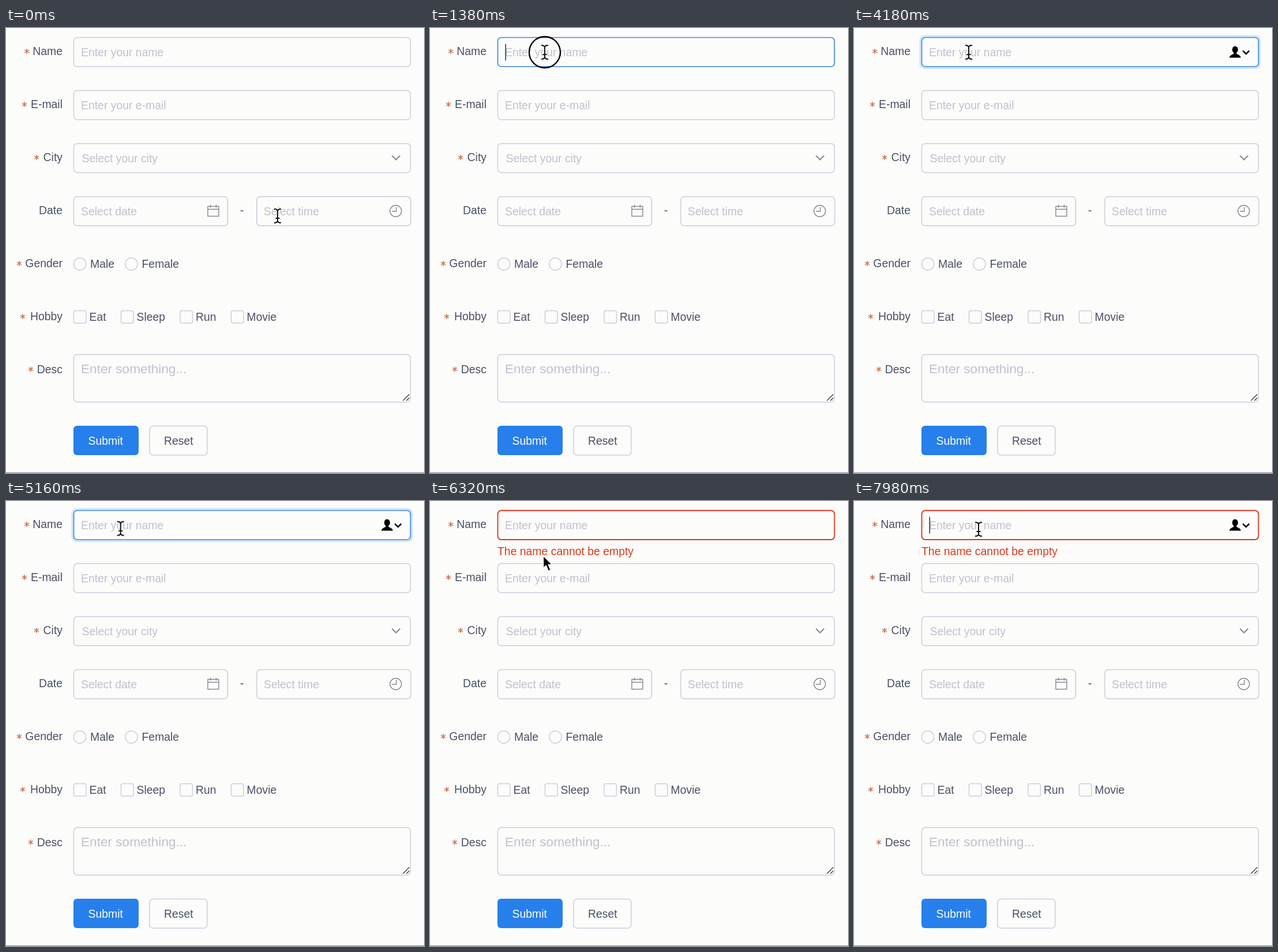
Recreate the animation shown at these times as an HTML page. Size 725x772 px, loop 8000 ms.

```html
<!DOCTYPE html>
<html lang="en">
<head>
<meta charset="utf-8">
<title>Form validation</title>
<style>
  html, body { margin: 0; width: 100%; height: 100%; overflow: hidden; background: #fcfcfb; }
  svg { display: block; width: 725px; height: 772px; font: 19.4px "Liberation Sans", Arial, sans-serif; }
  text { fill: #4a5062; }
  .hint { fill: #bfc1cd; }
  .big { font-size: 22.6px; }
  .box { fill: none; stroke: #cbcedb; stroke-width: 1.5; }
  .hover { fill: none; stroke: #458eea; stroke-width: 1.7; opacity: 0; }
  .icon { fill: none; stroke: #858794; stroke-width: 1.4; }
  .star { stroke: #cb6848; stroke-width: 1.4; }
  .error { fill: #d93b1c; }
</style>
</head>
<body>
<svg viewBox="0 0 725 772">
  <rect id="glow" fill="none" stroke="#cfe4fb"/>
  <g id="form"></g>
  <g class="icon">
    <path d="M669.500 221.500l7 7 7-7" stroke-width="2"/>
    <path d="M350 309.500h19v17h-19zM350 314.500h19M354.500 306.500v5M364.500 306.500v5"/>
    <circle cx="676" cy="317.500" r="10"/>
    <path d="M677 310.500v7.500h-7.500"/>
  </g>
  <path d="M688.500 646.500l11-11M694.500 646.500l5-5" stroke="#444" stroke-width="1.5"/>
  <rect x="117" y="690" width="113" height="51" rx="6" fill="#267fea"/>
  <text x="142.500" y="722.500" style="fill:#fff">Submit</text>
  <text x="274" y="722.500">Reset</text>
  <path d="M0 771.500h725" stroke="#8a8a8a"/>
  <rect id="invalid" x="117.500" y="16.500" width="584" height="50.500" rx="6" fill="none" stroke="#d93b1c" stroke-width="1.8"/>
  <text id="message" class="error" x="117" y="94">The name cannot be empty</text>
  <g id="autofill">
    <ellipse cx="661" cy="37.500" rx="5" ry="6"/>
    <path d="M658.500 42h5v3q7 2 7.500 6.500h-20q.500-4.500 7.500-6.500z"/>
    <path d="M674.500 39.500l5.500 5.500 5.500-5.500" fill="none" stroke="#000" stroke-width="2.500"/>
  </g>
  <path id="caret" d="M131.200 27.500v29" stroke="#3d4350" stroke-width="1.700"/>
  <g id="cursor">
    <g id="beam" fill="none">
      <path id="beamShape" d="M-6-12q6 0 6 4q0-4 6-4M0-8v16M-6 12q6 0 6-4q0 4 6 4M-3.500 4h7" stroke="#fff" stroke-width="4"/>
      <use href="#beamShape" style="display:none"/>
      <path d="M-6-12q6 0 6 4q0-4 6-4M0-8v16M-6 12q6 0 6-4q0 4 6 4M-3.500 4h7" stroke="#111" stroke-width="2"/>
    </g>
    <path id="arrow" d="M0-2v21.500l4.800-4.500 4 9.500 4-1.800-4-9.200h6.700z" fill="#000" stroke="#fff" stroke-width="1.500"/>
    <circle id="ring" fill="none" stroke="#000" stroke-width="2.300"/>
  </g>
</svg>
<script>
const $ = id => document.getElementById(id);
const form = $('form');
const LOOP = 8000, FOCUS = 1360, BLUR = 5960, REFOCUS = 7720;

function add(tag, attrs, content = '') {
  const node = document.createElementNS('http://www.w3.org/2000/svg', tag);
  for (const key in attrs) node.setAttribute(key, attrs[key]);
  node.textContent = content;
  return form.appendChild(node);
}
const label = (x, y, content, kind = '') => add('text', { x, y, class: kind }, content);
const box = (x, y, width, height, rx = 6, kind = 'box') =>
  add('rect', { x: x + .5, y: y + .5, width, height, rx, class: kind });

[['Name', 40, 36], ['E-mail', 132, 32], ['City', 224, 53], ['Date', 316],
 ['Gender', 408, 23], ['Hobby', 500, 29], ['Desc', 591.5, 43]].forEach(([name, y, starX]) => {
  label(98, y + 7, name).setAttribute('text-anchor', 'end');
  if (starX) add('path', { class: 'star', d: `M${starX} ${y - 4}v9M${starX - 4} ${y - 2}l8 5m0-5l-8 5` });
});

const fields = [
  [117, 16, 584, 50.5, 'Enter your name'],
  [117, 108, 584, 50.5, 'Enter your e-mail'],
  [117, 200, 584, 50.5, 'Select your city', 1.5],
  [117, 292, 267, 50.5, 'Select date'],
  [434.5, 292, 267, 50.5, 'Select time', -.5],
].map(([x, y, w, h, hint, shift = 0]) => {
  box(x, y, w, h);
  label(x + 13 + shift, y + 32.5, hint, 'hint');
  return { x, y, w, h, hover: box(x, y, w, h, 6, 'hover') };
});
box(117, 566, 584, 82.5);
label(130, 598.5, 'Enter something...', 'hint big');
label(406, 323, '-');
box(248.5, 690, 100, 50.5);

[[128, 'Male'], [217.5, 'Female']].forEach(([cx, name]) => {
  add('circle', { cx, cy: 409.5, r: 10.7, class: 'box' });
  label(cx + 18, 416, name);
});
[[117, 'Eat'], [199, 'Sleep'], [301.5, 'Run'], [390, 'Movie']].forEach(([x, name]) => {
  box(x, 490, 21.5, 21.5, 3);
  label(x + 27.5, 508, name);
});

const path = [
  [0, 471, 326], [1200, 199, 42], [5000, 199, 42], [5800, 196.5, 97],
  [6400, 196.5, 97], [6980, 198, 77], [7600, 216, 49], [LOOP, 216, 49],
];
const clicks = [[1320, 27], [5930, 34.5], [REFOCUS - 40, 28]];
const ramp = (t, start, length) => Math.min(1, Math.max(0, (t - start) / length));

function pointer(t) {
  const i = Math.max(1, path.findIndex(key => key[0] >= t));
  const [t0, x0, y0] = path[i - 1], [t1, x1, y1] = path[i];
  const p = ramp(t, t0, t1 - t0), eased = p * p * (3 - 2 * p);
  return [x0 + (x1 - x0) * eased, y0 + (y1 - y0) * eased];
}
const inside = (f, [x, y]) => x >= f.x && x <= f.x + f.w && y >= f.y && y <= f.y + f.h;

// A 200 ms linear transition equals the share of the last 200 ms spent hovering.
function hoverAmount(field, t) {
  let hits = 0;
  for (let k = 0; k < 20; k++) {
    const past = t - k * 10;
    if (past > 0 && inside(field, pointer(past))) hits++;
  }
  return hits / 20;
}

const show = (id, visible) => $(id).style.display = visible ? '' : 'none';

function render(t) {
  const spot = pointer(t), [x, y] = spot;
  const focused = t >= FOCUS && t < BLUR, refocused = t >= REFOCUS;
  const error = ramp(t, BLUR, 200);

  fields.forEach((field, i) => {
    const amount = i === 0 && t >= FOCUS ? +(error < 1) : hoverAmount(field, t);
    field.hover.style.opacity = amount;
  });

  const glow = ramp(t, 1430, 200) * (1 - error), spread = 3.5 * glow;
  const halo = { x: 117 - spread / 2, y: 16 - spread / 2, width: 585 + spread,
                 height: 51.5 + spread, rx: 7, 'stroke-width': spread, opacity: glow };
  for (const key in halo) $('glow').setAttribute(key, halo[key]);

  $('invalid').style.opacity = error;
  $('message').style.opacity = ramp(t, BLUR, 300);

  const blinkStart = refocused ? REFOCUS : FOCUS;
  show('caret', (focused || refocused) && (t - blinkStart) % 1000 < 500);
  show('autofill', (focused && t > 1500) || t > REFOCUS + 80);

  const overText = fields.some((f, i) => i !== 2 && inside(f, spot)) ||
    (t > 6200 && y > 66 && y < 95);
  show('beam', overText);
  show('arrow', !overText);
  $('cursor').setAttribute('transform', `translate(${x} ${y})`);

  const click = clicks.find(([start]) => t >= start && t < start + 150);
  $('ring').setAttribute('r', click ? click[1] * ramp(t, click[0], 60) : 0);
}

const begin = performance.now();
function tick() {
  render((performance.now() - begin) % LOOP);
  requestAnimationFrame(tick);
}
tick();
</script>
</body>
</html>
```
